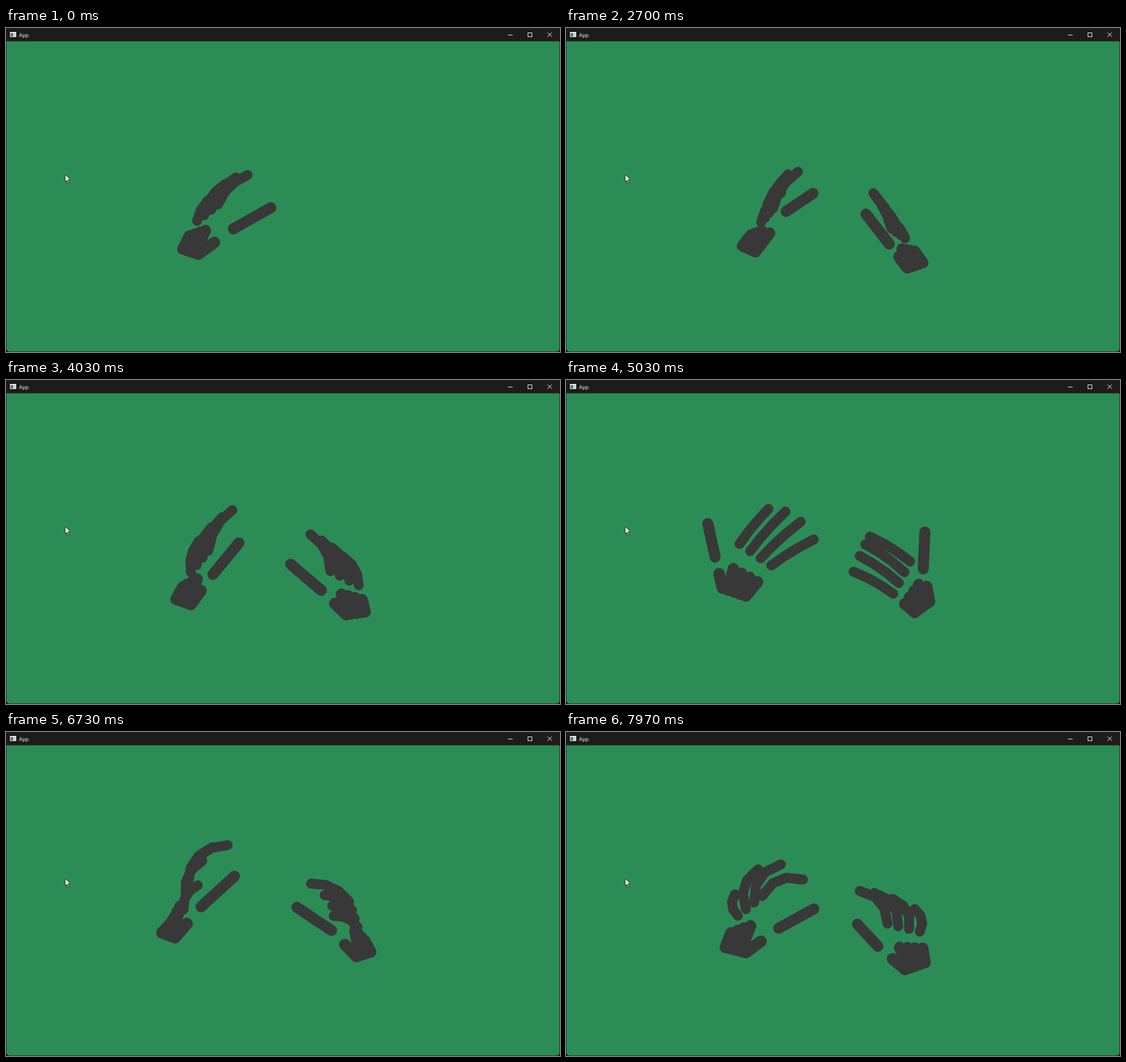
Recreate the animation shown at these times as an HTML page. Size 977x573 px, loop 8000 ms.

```html
<!DOCTYPE html>
<html lang="en">
<head>
<meta charset="utf-8">
<title>App</title>
<style>
  html, body { margin: 0; width: 100%; height: 100%; overflow: hidden; background: #111; }
  svg { display: block; width: 100vw; height: 100vh; }
  .hand path { fill: none; stroke: #383838; stroke-linecap: round; stroke-linejoin: round; }
  .thumb { stroke-width: 19.5px; }
  .palm { stroke-width: 20.5px; }
  .fingers { stroke-width: 17.5px; }
  text { font: 9.3px "Open Sans", "Noto Sans", sans-serif; fill: #fff; }
</style>
</head>
<body>
<svg viewBox="0 0 977 573">
  <rect width="977" height="573" fill="#1e1b18"/>
  <path d="M.8 23.5H976.2V566Q976.2 572.2 970 572.2H7Q.8 572.2 .8 566Z" fill="#2c8c56"/>
  <rect x="7" y="7" width="11" height="9" fill="#eee"/>
  <rect x="8" y="9" width="5" height="6" fill="#4b8078"/>
  <rect x="14" y="9" width="3" height="6" fill="#c9cdd0"/>
  <text x="23" y="15.5">App</text>
  <path d="M885.5 12.5H893.5M920.5 8.5H927.5V15.5H920.5ZM955 8L962.5 15.5M962.5 8L955 15.5" fill="none" stroke="#fff"/>
  <g id="stage"></g>
  <path d="M104.5 259V271.5L107.3 269L109.2 273.3L111 272.5L109.2 268.3H113Z" fill="#fff" stroke="#111" stroke-width=".8"/>
</svg>
<script>
const LOOP = 8000;
const ENTER = 2110;
const KNUCKLE = 0.46; // visible part of the bone from wrist to finger base
const stage = document.getElementById("stage");

const mix = (a, b, k) => a + (b - a) * k;
const mixPoint = (a, b, k) => [mix(a[0], b[0], k), mix(a[1], b[1], k)];
const hump = (t, from, to) => t > from && t < to ? Math.sin(Math.PI * (t - from) / (to - from)) : 0;

function make(name, parent, cls) {
  const node = document.createElementNS("http://www.w3.org/2000/svg", name);
  node.setAttribute("class", cls);
  return parent.appendChild(node);
}

function makeHand(side, start, drift) {
  const group = make("g", stage, "hand");
  const [palm, thumb, fingers] = ["palm", "thumb", "fingers"].map(cls => make("path", group, cls));
  return { group, palm, thumb, fingers, side, start, drift, poses: [] };
}

const left = makeHand(1, 0, t => [
  0.6 * hump(t, 0, 4060),
  -2.5 * hump(t, 0, 4060) - 12 * hump(t, 0, 870) - 20 * hump(t, 5030, 6730) - 10 * hump(t, 6730, 7970)
]);
const right = makeHand(-1, ENTER, t => {
  const k = Math.max(0, 1 - (t - ENTER) / 600) ** 2;
  return [182 * k, 85 * k];
});

// A pose holds points for the thumb, the fan of fingers and the wrist, plus the finger curl.
function pose(hand, time, thumb, tips, bases, wrist, curl) {
  hand.poses.push({ time, points: [...thumb, ...tips, ...bases, ...wrist, [curl, 0]] });
}

for (const time of [0, 2030]) {
  pose(left, time, [[467, 318], [401, 355]], [[426, 260], [396, 269], [371, 294]],
    [[374, 312], [337, 341]], [[339, 400], [312, 391]], 0.1);
}
pose(left, 3330, [[405, 273], [375, 300]], [[392, 253], [375, 264], [386, 293]],
  [[356, 330], [350, 350]], [[328, 396], [310, 384]], 0.08);
pose(left, 4030, [[411, 288], [365, 344]], [[399, 230], [372, 251], [340, 285]],
  [[357, 302], [326, 340]], [[326, 397], [300, 388]], 0.1);
pose(left, 5030, [[250, 254], [263, 313]], [[357, 228], [401, 240], [437, 282]],
  [[306, 290], [362, 328]], [[276, 368], [317, 382]], 0.02);
pose(left, 6730, [[403, 255], [344, 309]], [[391, 200], [354, 213], [338, 271]],
  [[325, 245], [313, 314]], [[298, 364], [275, 355]], 0.15);
pose(left, 7970, [[437, 313], [375, 347]], [[418, 261], [359, 234], [298, 287]],
  [[346, 290], [303, 325]], [[317, 390], [281, 381]], 0.18);

pose(right, 3330, [[529, 329], [570, 382]], [[542, 292], [555, 309], [580, 345]],
  [[574, 355], [598, 372]], [[602, 424], [629, 415]], 0.05);
pose(right, 4030, [[502, 326], [556, 372]], [[537, 273], [566, 290], [594, 312]],
  [[572, 338], [622, 363]], [[600, 415], [633, 410]], 0.12);
pose(right, 5030, [[633, 269], [630, 334]], [[536, 277], [523, 300], [507, 339]],
  [[607, 321], [577, 378]], [[641, 392], [615, 411]], 0.03);
pose(right, 6730, [[513, 310], [574, 351]], [[538, 268], [570, 298], [578, 325]],
  [[605, 300], [620, 345]], [[618, 397], [643, 389]], 0.12);
pose(right, 7970, [[514, 340], [550, 379]], [[518, 281], [559, 289], [615, 313]],
  [[567, 339], [624, 353]], [[598, 420], [633, 408]], 0.18);

function poseAt(poses, t) {
  const next = poses.findIndex(p => p.time > t);
  if (next <= 0) return poses[next < 0 ? poses.length - 1 : 0].points;
  const a = poses[next - 1], b = poses[next];
  const k = (t - a.time) / (b.time - a.time);
  return a.points.map((p, i) => mixPoint(p, b.points[i], k));
}

// Point at u on the parabola through a (0), b (0.5) and c (1).
function arc(a, b, c, u) {
  return [0, 1].map(i =>
    a[i] * (1 - u) * (1 - 2 * u) + b[i] * 4 * u * (1 - u) + c[i] * u * (2 * u - 1));
}

// Three bones from base to tip, bowed sideways by the curl.
function finger(base, tip, curl) {
  const dx = tip[0] - base[0], dy = tip[1] - base[1];
  return [0, 1, 2, 3].map(j => {
    const bow = j % 3 ? curl : 0;
    return [base[0] + dx * j / 3 + dy * bow, base[1] + dy * j / 3 - dx * bow];
  });
}

const line = points => "M" + points.map(p => p.map(v => v.toFixed(1)).join(" ")).join("L");

function drawHand(hand, t) {
  const shown = t >= hand.start;
  hand.group.style.display = shown ? "" : "none";
  if (!shown) return;

  const [thumbTip, thumbBase, tipA, tipB, tipC, baseA, baseC, wristA, wristC, [curl]] = poseAt(hand.poses, t);
  const bases = [thumbBase];
  let fingers = "";
  for (let i = 0; i < 4; i++) {
    const base = mixPoint(baseA, baseC, i / 3);
    bases.push(base);
    fingers += line(finger(base, arc(tipA, tipB, tipC, i / 3), curl * hand.side));
  }
  const palm = bases.map((base, i) => {
    const wrist = mixPoint(wristA, wristC, i / 4);
    return line([wrist, mixPoint(wrist, base, KNUCKLE)]);
  });

  hand.group.setAttribute("transform", `translate(${hand.drift(t).map(v => v.toFixed(1)).join(" ")})`);
  hand.thumb.setAttribute("d", line([thumbBase, thumbTip]));
  hand.fingers.setAttribute("d", fingers);
  hand.palm.setAttribute("d", palm.join(""));
}

const origin = performance.now();
function draw() {
  const t = (performance.now() - origin) % LOOP;
  drawHand(left, t);
  drawHand(right, t);
  requestAnimationFrame(draw);
}
draw();
</script>
</body>
</html>
```
